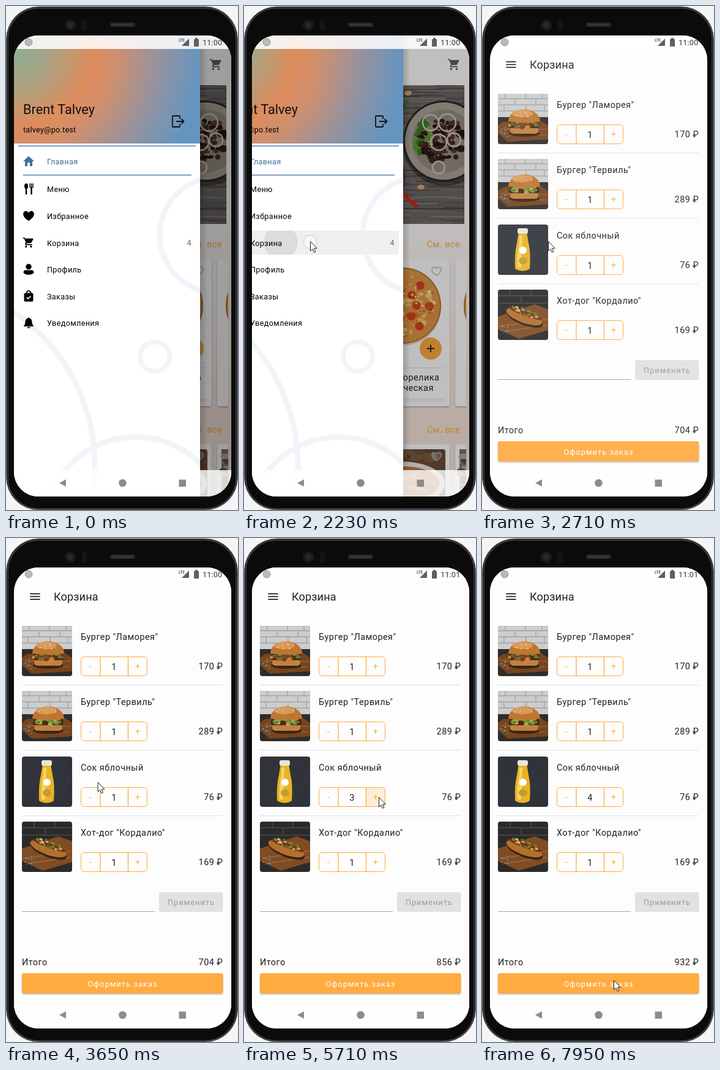
Write an HTML page that moves like this. It is 379x821 px and loops after 8 s.

```html
<!DOCTYPE html>
<html lang="ru">
<head>
<meta charset="utf-8">
<title>Доставка еды</title>
<style>
html, body { margin: 0; width: 100%; height: 100%; overflow: hidden; background: #f5f5f5; }
svg { display: block; width: 379px; height: 821px; }
text { font-family: Roboto, sans-serif; font-size: 14.46px; letter-spacing: .45px; fill: #202020; }
.small { font-size: 12.65px; letter-spacing: .23px; fill: #000; }
.item { font-size: 12.65px; letter-spacing: .35px; fill: #000; }
.head { font-size: 18.1px; letter-spacing: .14px; }
.name { font-size: 21.7px; letter-spacing: 0; fill: #111; }
.button { font-size: 12.65px; letter-spacing: 1.13px; }
.bold { font-weight: 700; }
.mid { text-anchor: middle; }
.end { text-anchor: end; }
</style>
</head>
<body>
<svg id="stage" viewBox="0 0 379 821" xmlns="http://www.w3.org/2000/svg"></svg>
<script>
const ORANGE = '#ffab40', BLUE = '#44709d';
const LOOP = 8000;

// Drawing helpers, each returns SVG markup
const text = (x, y, s, cls = '', extra = '') => `<text x="${x}" y="${y}" class="${cls}" ${extra}>${s}</text>`;
const rect = (x, y, w, h, fill, extra = '') => `<rect x="${x}" y="${y}" width="${w}" height="${h}" fill="${fill}" ${extra}/>`;
const circle = (x, y, r, fill, extra = '') => `<circle cx="${x}" cy="${y}" r="${r}" fill="${fill}" ${extra}/>`;
const oval = (x, y, rx, ry, fill, extra = '') => `<ellipse cx="${x}" cy="${y}" rx="${rx}" ry="${ry}" fill="${fill}" ${extra}/>`;
const path = (d, fill, extra = '') => `<path d="${d}" fill="${fill}" ${extra}/>`;
const line = (d, color, width = 1, extra = '') => path(d, 'none', `stroke="${color}" stroke-width="${width}" ${extra}`);
const at = (x, y, body, scale = 1) => `<g transform="translate(${x} ${y}) scale(${scale})">${body}</g>`;
const clipped = (id, body) => `<g clip-path="url(#${id})">${body}</g>`;
const clip = (id, shape) => `<clipPath id="${id}">${shape}</clipPath>`;

let seed = 7;
const random = () => (seed = seed * 16807 % 2147483647) / 2147483647;
const scatter = (n, x, y, rx, ry, size, colors) => Array.from({ length: n }, () => {
  const a = random() * 6.283, d = Math.sqrt(random());
  return oval((x + rx * d * Math.cos(a)).toFixed(1), (y + ry * d * Math.sin(a)).toFixed(1),
    (size * (.5 + random())).toFixed(1), (size * (.4 + random() * .6)).toFixed(1),
    colors[Math.floor(random() * colors.length)]);
}).join('');

const cartIcon = color => path('M1 2v2h2l3.6 7.6-1.4 2.4C4.5 15.4 5.5 17 7 17h12v-2H7.4l1.1-2h7.5c.7 0 1.4-.4 1.7-1L21.3 5.5C21.6 4.8 21.2 4 20.4 4H5.2l-.9-2z', color)
  + circle(7, 20, 2, color) + circle(17, 20, 2, color);
const HEART = 'M0 8C-13 0-9-8-4.5-8-2-8 0-6 0-4.5 0-6 2-8 4.5-8 9-8 13 0 0 8Z';
const hamburger = line('M39.300 90.900h16.300m-16.300 4.500h16.300m-16.300 4.500h16.300', '#222', 1.8);

function hero() {
  const plate = (x, y, r) => circle(x + 2, y + 4, r + 3, '#1c1a19', 'opacity=".5"') + circle(x, y, r, '#2b2725')
    + circle(x, y, r - 3, '#aca295') + circle(x, y, r * .78, '#968d83');
  const rings = [[332, 190, 14], [343, 218, 11], [318, 222, 13], [305, 190, 13], [318, 263, 10]];
  const chili = d => line(d, '#d8260f', 6, 'stroke-linecap="round"');
  const nuts = [[268, 142], [193, 188], [222, 190], [220, 202], [250, 213], [43, 292], [68, 296], [289, 295], [186, 176]];
  const grain = Array.from({ length: 260 }, () => {
    const x = (random() * 360 - 20).toFixed(0), y = (129 + random() * 226).toFixed(1);
    return line(`M${x} ${y}q${(20 + random() * 30).toFixed(0)} ${(random() * 4 - 2).toFixed(1)} 70 0`,
      ['#4b4745', '#8d8884', '#5b5755', '#7a7572'][Math.floor(random() * 4)], 1.3);
  }).join('');
  return clipped('heroClip', rect(21, 129, 339, 226, '#6b6764') + grain
    + line('M21 190H360M21 268H360M21 330H360', '#3f3b39', 1.5)
    + scatter(34, 172, 182, 30, 30, 4, ['#4f8a2c', '#69a53d', '#38701f'])
    + line('M150 130C160 170 175 160 168 210M168 160Q220 140 272 162', '#4d8030', 2)
    + scatter(14, 230, 163, 36, 12, 3.5, ['#4f8a2c', '#38701f', '#2f4a22'])
    + nuts.map(([x, y]) => oval(x, y, 6, 4, '#d9a773')).join('')
    + plate(40, 222, 68)
    + [[40, 195], [70, 215], [45, 242], [28, 222]].map(([x, y]) => rect(x - 15, y - 12, 30, 26, '#b06c2c', 'rx="7"')).join('')
    + scatter(40, 48, 218, 32, 36, 4, ['#c58238', '#8c4d1e', '#d99a50', '#b8742e']) + scatter(12, 40, 208, 18, 12, 4, ['#6f9f36', '#86b548'])
    + circle(36, 197, 9, '#f1eadb') + circle(39, 239, 9, '#f1eadb') + circle(72, 219, 7, '#f1eadb')
    + plate(326, 220, 66) + scatter(20, 290, 212, 11, 27, 7, ['#5d9a34', '#3f7926'])
    + scatter(75, 323, 219, 36, 36, 6, ['#2e1c16', '#432820', '#5b3828', '#241511'])
    + scatter(45, 322, 215, 32, 30, 1.3, ['#e0b575', '#c98f52'])
    + rings.map(([x, y, r]) => circle(x, y, r, 'none', 'stroke="#cfc9cb" stroke-width="2.5"')).join('')
    + plate(191, 275, 67)
    + path('M188 238Q188 216 205 220 212 208 226 217 240 207 250 222 265 226 258 240 266 256 255 266 240 268 230 262Z', '#5fa62f')
    + scatter(18, 232, 238, 22, 18, 6, ['#72b83c', '#4d9226', '#8cc653'])
    + scatter(22, 168, 265, 19, 20, 6, ['#36551f', '#233a18', '#502d20'])
    + [0, 1, 2, 3].map(i => oval(178 + i * 13, 275 + i, 8, 24, i % 2 ? '#9a6a58' : '#6b4339', `transform="rotate(18 ${178 + i * 13} 275)"`)).join('')
    + circle(198, 268, 13, 'none', 'stroke="#d8cccb" stroke-width="2.5"') + line('M160 285Q190 310 222 285', '#cfc4c2', 2.5)
    + chili('M166 271Q176 277 188 276') + chili('M202 153Q215 160 226 179') + chili('M255 297Q265 315 281 325')
    + chili('M34 330Q40 318 46 302') + chili('M131 238l6-2')
    + circle(106, 313, 26, '#d5d0ca') + circle(106, 312, 21, '#8a4b1d') + scatter(12, 106, 312, 15, 13, 2, ['#a9692f', '#6b3915']));
}

function pizza(x, y, cheese = ['#f2cd80', '#e39445', '#f6dfa5', '#d9742f', '#f0bd68'], topping = '#d23a18') {
  const slice = (_, i) => {
    const r = i % 2 ? 43 : 22, a = i * .9;
    return circle((x + r * Math.cos(a)).toFixed(1), (y + r * Math.sin(a)).toFixed(1), 7, topping, 'opacity=".9"');
  };
  return circle(x, y + 3, 62, '#c9a37c', 'opacity=".5"') + circle(x, y, 62, '#b9702c') + circle(x, y, 60, '#dc9a48')
    + circle(x, y, 54, cheese[1]) + scatter(90, x, y, 50, 50, 5, cheese)
    + Array.from({ length: 14 }, slice).join('') + scatter(50, x, y, 49, 49, 2.2, cheese)
    + scatter(24, x, y, 46, 46, 1.4, ['#7a7a2c', '#5b3a18']);
}

const camera = rect(48, 458, 101, 70, '#c9cdd5', 'rx="5"') + path('M76 460L81 449H116L121 460Z', '#c9cdd5', 'stroke="#c9cdd5" stroke-width="3" stroke-linejoin="round"')
  + circle(98, 493, 22, '#c9cdd5', 'stroke="#aee2dc" stroke-width="5"') + circle(98, 493, 14, '#fff') + circle(134, 473, 5, '#fff');

const emptyHeart = (x, y) => at(x, y, path(HEART, '#fff', 'fill-opacity=".3" stroke="#b5b5b5" stroke-width="1.6"'), .86);

function card(x, y, picture, price, title) {
  const c = x + 76;
  return rect(x, y, 152, 240, '#fff', 'rx="4" filter="url(#shadow)"') + picture + emptyHeart(x + 130.5, y + 20)
    + (price ? circle(x + 121, y + 146, 18, ORANGE) + line(`M${x + 115} ${y + 146}h12m-6-6v12`, '#222', 1.8)
      + text(x + 21, y + 168, price, 'bold') + line(`M${x + 9} ${y + 177.5}h134M${x + 9} ${y + 228.5}h134m0 3h-134`, '#ddd')
      + text(c, y + 198, title, 'mid') + text(c, y + 215, 'классическая', 'mid') : '');
}

function home() {
  const pie = rect(191, 722, 138, 90, '#6d4c36') + scatter(26, 260, 730, 66, 10, 10, ['#4f3422', '#7b5a42', '#5f4230'])
    + oval(258, 778, 70, 36, '#efe8e0') + oval(263, 778, 56, 28, '#b9783f')
    + line('M215 770L300 790M235 758L315 778M225 790L290 757', '#dba468', 4);
  return rect(13, 48, 355, 751, 'url(#peach)') + hamburger + at(332.1, 84.5, cartIcon('#606060'), .904) + hero()
    + text(29, 397, 'Рекомендуем', 'head') + text(29, 699, 'Лучшее', 'head')
    + [393, 695].map(y => text(299, y, 'См. все', '', `style="fill:${ORANGE}"`)).join('')
    + clipped('rowClip', card(22, 412, camera, '580 ₽', 'Пицца Верлонетта')
      + card(184, 412, pizza(260, 488), '480 ₽', 'Пицца Зорелика') + card(345, 412, pizza(421, 488))
      + card(22, 714, pizza(98, 788, ['#f3e3bd', '#efd9a6', '#f8efd6', '#e3bd7c'], '#e9c58c')) + card(184, 714, clipped('pieClip', pie))
      + card(345, 714, rect(352, 722, 20, 80, '#77706a') + scatter(12, 360, 750, 9, 25, 6, ['#b0a79f', '#5b504a'])));
}

const menuIcons = [
  path('M-9 0L0-8.5 9 0H6V8H2V2H-2V8H-6V0Z', BLUE),
  oval(-4, -4.5, 3, 4.5, '#000') + line('M-4 0V9M4.5 -3V9', '#000', 2.4) + line('M2-9V-3Q4.500-1 7-3V-9M4.500-9V-3', '#000', 1.4),
  path(HEART, '#000'),
  at(-10, -10, cartIcon('#000'), .82),
  circle(0, -4.3, 4.7, '#000') + path('M-8.500 5C-8 0-4 1.500 0 1.500S8 0 8.500 5C7 10-7 10-8.500 5Z', '#000'),
  rect(-7.5, -5, 15, 14, '#000', 'rx="2.5"') + line('M-3.500-4V-6Q0-11 3.500-6V-4', '#000', 1.8) + line('M-3 2L-1 4.500 3.500 0', '#fff', 1.6),
  path('M-8 5C-5 3-6-2-5-4-4-7-2-7-1-8Q0-9 1-8C2-7 4-7 5-4 6-2 5 3 8 5V6H-8Z', '#000') + path('M-3 7H3Q0 11-3 7Z', '#000')
];

function drawer() {
  const labels = ['Главная', 'Меню', 'Избранное', 'Корзина', 'Профиль', 'Заказы', 'Уведомления'];
  const ys = [253, 298, 342, 385.5, 429, 472.5, 516];
  const ring = (x, y, r, w) => circle(x, y, r, 'none', `stroke="#f1f5f9" stroke-width="${w}"`);
  return rect(317, 48, 12, 751, 'url(#edge)')
    + clipped('drawerClip', rect(13, 48, 304, 751, '#fff')
      + ring(345, 373, 94, 9) + ring(243, 571, 24, 8) + ring(-158, 749, 303, 9) + ring(212, 852, 150, 9)
      + rect(13, 48, 304, 176, 'url(#header)')
      + line('M20 228H310M28 275.500H303', '#7d9dc4', 2)
      + `<g id="ripple">${rect(13, 366, 297, 39, '#efefee')}${clipped('rippleClip', '<circle id="wave" cx="117" cy="385" fill="#dbdcdb"/>')}</g>`
      + text(28, 176, 'Brent Talvey', 'name') + text(28, 206, 'talvey@po.test', 'small')
      + line('M284 184V180Q284 179 283 179H273Q272 179 272 180V196Q272 197 273 197H283Q284 197 284 196V192M278 188H290M286.500 184L290.500 188 286.500 192', '#111', 1.8)
      + labels.map((s, i) => at(37, ys[i], menuIcons[i]) + text(67, ys[i] + 5, s, 'item', i ? '' : `style="fill:${BLUE}"`)).join('')
      + text(303, 390, '4', 'item end', `style="fill:${BLUE}"`));
}

const wall = rect(0, 0, 82, 82, '#2f2c2a') + rect(0, 0, 82, 38, '#cccdce')
  + line('M0 8H82M0 18H82M0 28H82M12 0V8M45 0V8M72 0V8M28 8V18M62 8V18M10 18V28M46 18V28M76 18V28', '#a3a4a5', 1.4);
const board = path('M8 46L68 43 82 52V74L16 78 0 64V52Z', '#75451f') + line('M4 57L80 58M6 65L78 67', '#8f5a2d', 2)
  + scatter(22, 16, 62, 16, 10, 1.3, ['#a9a9ad', '#55565b']);
const burger = filling => wall + board + oval(43, 65, 25, 5, '#3d2412') + rect(20, 54, 46, 11, '#c08243', 'rx="5"')
  + rect(18, 46, 50, 10, '#4b2918', 'rx="4"') + scatter(36, 43, 50, 25, 6, 3, filling)
  + path('M17 45C18 19 68 19 69 45Q44 50 17 45Z', '#bd7631') + oval(40, 32, 17, 6, '#d99a58')
  + scatter(16, 43, 34, 18, 6, .8, ['#f3d9a3']);
const juice = rect(0, 0, 82, 82, '#30343a') + scatter(70, 41, 41, 44, 44, 1, ['#3c4148', '#262a2f'])
  + path('M34 12H47L50 30Q54 45 52 72Q41 79 28 72Q27 45 31 30Z', '#e8b325') + path('M35 18H40L38 70H32Q31 45 35 30Z', '#f6d461')
  + rect(32, 6, 17, 9, '#e9e5d8', 'rx="3"') + oval(41, 59, 7, 6, '#c69a2c') + circle(41, 42, 6, '#fff');
const hotdog = rect(0, 0, 82, 82, '#2b2a2a') + line('M0 10H82M0 22H82M20 0V10M54 0V10M38 10V22', '#44423f', 2)
  + path('M0 44L60 24 82 32V66L34 80 0 64Z', '#7f4c24') + line('M4 60L80 48M12 68L80 58', '#99633a', 2)
  + oval(44, 48, 31, 10, '#3d2412', 'transform="rotate(20 44 48)"') + oval(43, 44, 31, 10, '#b0702f', 'transform="rotate(20 43 44)"')
  + oval(45, 39, 29, 4, '#7c3319', 'transform="rotate(20 45 39)"')
  + at(45, 37, `<g transform="rotate(20)">${scatter(26, 0, 0, 26, 5, 2.2, ['#6f8c34', '#cf9c3c', '#57742a', '#d9c07a'])}</g>`)
  + scatter(20, 14, 64, 12, 8, 1.2, ['#a9a9ad', '#60606a']);

function cart() {
  const goods = [
    ['Бургер "Ламорея"', 170, burger(['#7a3d22', '#c9852f', '#8b5a2c', '#5c8235'])],
    ['Бургер "Тервиль"', 289, burger(['#6f9438', '#8da645', '#c9a552', '#54742a'])],
    ['Сок яблочный', 76, juice],
    ['Хот-дог "Кордалио"', 169, hotdog]
  ];
  const row = ([title, price, picture], i) => at(0, Math.round(i * 106.4), at(26, 143, clipped('thumb', picture))
    + text(122, 166, title)
    + (i === 2 ? `<rect id="press" x="200" y="194" width="30.500" height="31" fill="${ORANGE}" rx="3"/>` : '')
    + rect(122.5, 193.5, 108, 31, 'none', `rx="5" stroke="${ORANGE}"`) + line('M154 194V225M199.500 194V225', ORANGE, 1.3)
    + text(138, 214, '-', 'mid', `style="fill:${ORANGE}"`) + text(215, 214, '+', 'mid', `style="fill:${ORANGE}"`)
    + text(176.5, 214.5, '1', 'mid', i === 2 ? 'id="count"' : '') + text(354.4, 214, price + ' ₽', 'end')
    + (i < 3 ? line('M26 239.500H354', '#e0e0e0') : ''));
  return rect(13, 48, 355, 751, '#fdfdfd') + hamburger + text(78, 102, 'Корзина', 'head') + goods.map(row).join('')
    + line('M26 608.500H243', '#a5a5a5') + rect(250, 577, 104.5, 32, '#e1e1df', 'rx="3"')
    + text(302.5, 598, 'Применить', 'button mid', 'style="fill:#999997"')
    + text(26, 696, 'Итого') + text(354.4, 696, '', 'end', 'id="total"')
    + rect(26, 709, 328.5, 33, ORANGE, 'rx="3" filter="url(#shadow)"') + text(190.5, 731, 'Оформить заказ', 'button mid', 'style="fill:#fff"');
}

const bars = rect(13, 48, 355, 22, '#fff', 'opacity=".86"') + rect(13, 756, 355, 43, '#fff', 'opacity=".8"')
  + circle(37, 59, 6, '#b9b9b9', 'stroke="#999"') + text(282, 58, 'LTE', '', 'style="font-size:6.500px;letter-spacing:-.3px;font-weight:700;fill:#666"')
  + path('M299 53V65H287Z', '#5f5f5f') + path('M307 54H309V52H313V54H315V66H307Z', '#5f5f5f')
  + text(321, 64, '', '', 'id="clock" style="font-size:12.650px;letter-spacing:0;font-weight:500;fill:#606060"')
  + path('M87 777L98 771V783Z', '#8c8c8c') + circle(190.5, 777, 6.3, '#8c8c8c') + rect(282.5, 771.5, 11.5, 11.5, '#8c8c8c');

const phone = rect(.5, 1, 378, 820, '#0b0b0b', 'rx="53" stroke="#8a8a8a"') + rect(3, 3.5, 373, 815.5, 'none', 'rx="50" stroke="#484848" stroke-width="1.5"')
  + circle(105, 31, 9, '#1b1b1d') + circle(105, 31, 4.5, '#29292e') + rect(124, 23, 8, 17, '#151517', 'rx="3"')
  + rect(170, 27, 41, 7, '#29292b', 'rx="3.500"') + line('M174 30.500H207', '#48484a', 2, 'stroke-dasharray="2 1"');

const stop = (offset, color, alpha = 1) => `<stop offset="${offset}" stop-color="${color}" stop-opacity="${alpha}"/>`;
const defs = `<defs>
  ${clip('screen', rect(13, 48, 355, 751, '#000', 'rx="40"'))}
  ${clip('heroClip', rect(21, 129, 339, 226, '#000'))}
  ${clip('rowClip', rect(13, 400, 350, 400, '#000'))}
  ${clip('pieClip', rect(191, 722, 138, 80, '#000', 'rx="4"'))}
  ${clip('drawerClip', rect(13, 48, 304, 751, '#000'))}
  ${clip('rippleClip', rect(13, 366, 297, 39, '#000'))}
  ${clip('thumb', rect(0, 0, 82, 82, '#000', 'rx="4"'))}
  <linearGradient id="peach" x2="0" y2="1">${stop(.38, '#fff') + stop(.5, '#fcf5f1') + stop(.8, '#f6e5db')}</linearGradient>
  <linearGradient id="edge">${stop(0, '#000', .18) + stop(1, '#000', 0)}</linearGradient>
  <radialGradient id="header" gradientUnits="userSpaceOnUse" cx="13" cy="70" r="320">
    ${stop(0, '#8dae93') + stop(.18, '#a8a384') + stop(.4, '#de8c5c') + stop(.52, '#d08f6d') + stop(.72, '#9a929c') + stop(.95, '#6595bf')}
  </radialGradient>
  <filter id="shadow" x="-10%" y="-10%" width="120%" height="125%"><feDropShadow dx="0" dy="1.500" stdDeviation="1.200" flood-opacity=".28"/></filter>
</defs>`;

document.getElementById('stage').innerHTML = defs + phone
  + clipped('screen', rect(13, 48, 355, 751, '#fff') + `<g id="home">${home()}</g>`
    + `<rect id="scrim" x="13" y="48" width="355" height="751"/>`
    + `<g id="drawer">${drawer()}</g><g id="cart">${cart()}</g>` + bars)
  + `<g id="cursor">${circle(0, 1, 10.5, '#fff', 'id="tap" fill-opacity=".5" stroke="#999" stroke-opacity=".5"')}
     ${path('M.500 .500V16L4 12.800 6.400 18.300 8.900 17.200 6.500 11.800H11.300Z', '#fff', 'stroke="#222"')}</g>`;

const el = Object.fromEntries(['home', 'scrim', 'drawer', 'ripple', 'wave', 'cart', 'press', 'count', 'total', 'clock', 'cursor', 'tap']
  .map(id => [id, document.getElementById(id)]));
const set = (name, attrs) => Object.entries(attrs).forEach(([k, v]) => el[name].setAttribute(k, v));
const clamp = v => Math.min(1, Math.max(0, v));

// Cursor stops: time, x, y
const STOPS = [[0, 320, 835], [770, 320, 835], [1530, 127, 405], [1810, 108, 383], [3510, 108, 383],
  [4190, 220, 422], [6870, 220, 422], [7680, 217, 695], [7950, 215, 720], [LOOP, 215, 720]];
const MENU_TAP = 2030, PLUS_TAPS = [4520, 5300, 6130];

function cursorAt(t) {
  const i = STOPS.findIndex(s => s[0] > t);
  const [t0, x0, y0] = STOPS[i - 1], [t1, x1, y1] = STOPS[i];
  const p = (t - t0) / (t1 - t0), e = p * (2 - p);
  return [x0 + (x1 - x0) * e, y0 + (y1 - y0) * e];
}

function highlight(age) {
  if (age < 0 || age > 550) return 0;
  return age < 340 ? .4 * clamp((age + 70) / 210) : .2;
}

function draw(t) {
  const slide = t < 2230 ? 0 : [57, 190, 275][Math.floor((t - 2230) / 70)] ?? 320;
  set('drawer', { transform: `translate(${-slide} 0)` });
  set('scrim', { opacity: .38 * clamp(1 - slide / 304) ** 2 });
  set('ripple', { opacity: t < MENU_TAP ? 0 : 1 });
  set('wave', { r: 28 * clamp((t - MENU_TAP + 70) / 270) });
  set('home', { opacity: t < 2710 ? 1 : 0 });
  set('cart', { opacity: t < 2640 ? 0 : t < 2710 ? .5 : .92 + .08 * clamp((t - 2710) / 140) });

  const added = PLUS_TAPS.filter(tap => t >= tap + 300).length;
  el.count.textContent = 1 + added;
  el.total.textContent = `${704 + 76 * added} ₽`;
  el.clock.textContent = t < 5400 ? '11:00' : '11:01';
  set('press', { opacity: Math.max(...PLUS_TAPS.map(tap => highlight(t - tap))) });

  set('cursor', { transform: `translate(${cursorAt(t).join(' ')})` });
  set('tap', { opacity: [MENU_TAP, ...PLUS_TAPS].some(tap => t >= tap && t < tap + 270) ? 1 : 0 });
}

const start = performance.now();
function frame() {
  draw((performance.now() - start) % LOOP);
  requestAnimationFrame(frame);
}
frame();
</script>
</body>
</html>
```
